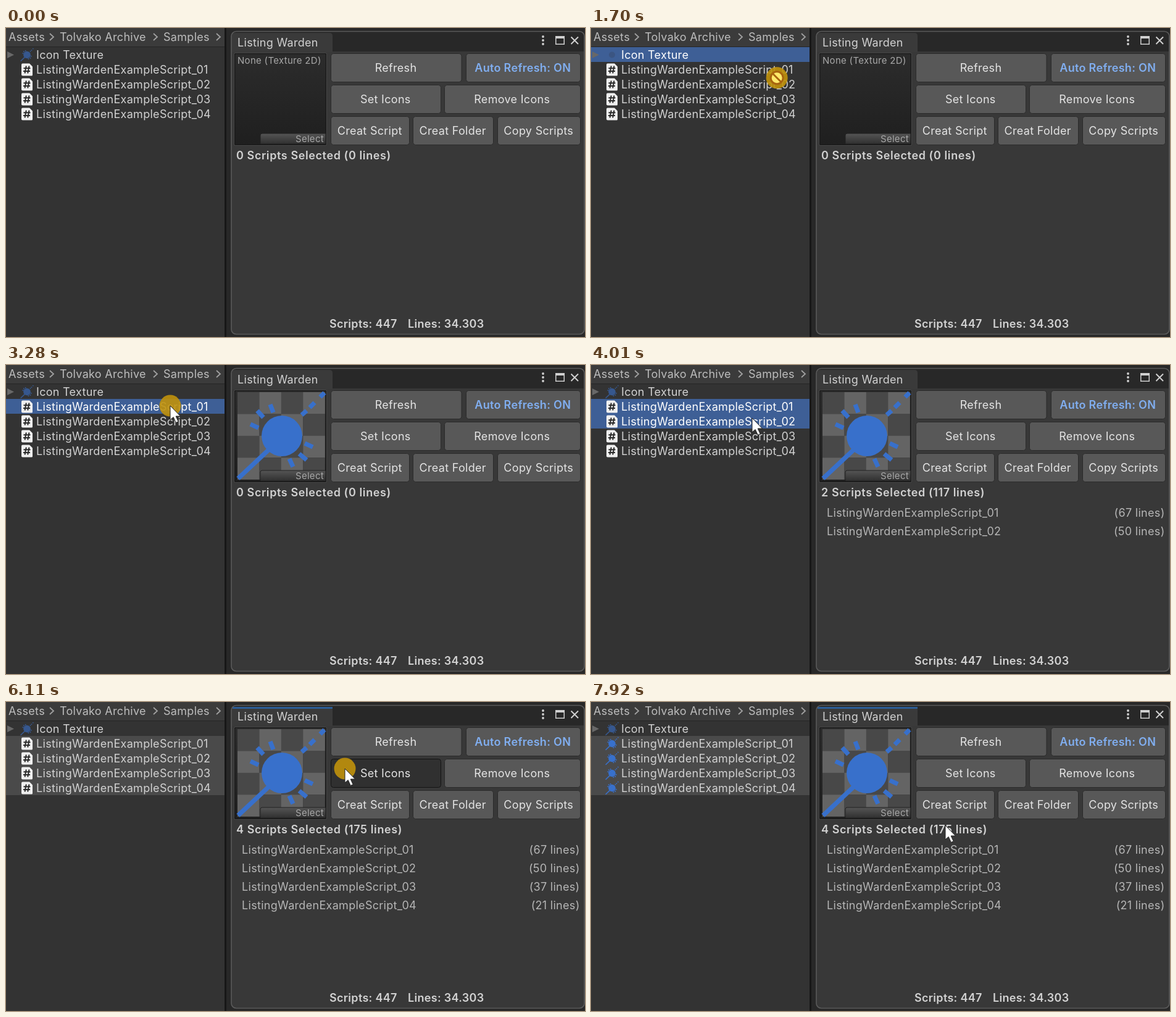
These frames come from a looping animation (938x501 px, 7990 ms). An HTML page:

```html
<!DOCTYPE html>
<html lang="en">
<head>
<meta charset="utf-8">
<title>Listing Warden</title>
<style>
  html, body { margin: 0; width: 100%; height: 100%; overflow: hidden; background: #333; }
  svg { display: block; width: 938px; height: 501px; }
  text { font: 400 18px Inter, "Open Sans", sans-serif; letter-spacing: .3px; fill: #d2d2d2; white-space: pre; }
  .bold { font-weight: 600; }
  .wide { letter-spacing: .6px; }
  .small { font-size: 15px; fill: #a8a8a8; }
</style>
</head>
<body>
<svg id="stage" viewBox="0 0 938 501">
  <defs>
    <linearGradient id="well" x2="0" y2="1">
      <stop stop-color="#2c2c2c"/><stop offset="1" stop-color="#1f1f1f"/>
    </linearGradient>
    <linearGradient id="strip" x2="0" y2="1">
      <stop stop-color="#555"/><stop offset="1" stop-color="#303030"/>
    </linearGradient>
    <g id="wand" stroke="#3870cb" fill="none">
      <circle cx="72" cy="71" r="33" fill="#3870cb" stroke="none"/>
      <path d="M1 140L50 94M104 37l8-7M117 25l8-8M134 8l7-7M53 20l5 13M32 30l10 11M21 52l13 6M109 83l13 6M100 100l12 10M84 108l6 13"/>
    </g>
    <g id="mini">
      <use href="#wand" transform="translate(23.5 -10.5) scale(.148)" stroke-width="11"/>
      <circle cx="34" cy="0" r="5.8" fill="#3870cb"/>
    </g>
    <g id="page">
      <path d="M27 -10H38L43 -5V8.5Q43 10 41.500 10H27Q25 10 25 8V-8Q25 -10 27 -10Z" fill="#f0f0f0"/>
      <path d="M32.800 -6L30.500 6M37.500 -6L35.200 6M28.500 -2.200H39.500M28 2.600H39" stroke="#2b2b2b" stroke-width="2" fill="none"/>
    </g>
  </defs>
</svg>
<script>
const LOOP = 7990, STEP = 70;
const svg = document.getElementById('stage');

function add(tag, attrs, parent = svg, text) {
  const node = document.createElementNS('http://www.w3.org/2000/svg', tag);
  set(node, attrs);
  if (text) node.textContent = text;
  parent.append(node);
  return node;
}
function set(node, attrs) {
  for (const k in attrs) node.setAttribute(k, attrs[k]);
}
const rect = (x, y, width, height, fill, more, parent) =>
  add('rect', { x, y, width, height, fill, ...more }, parent);
const label = (x, y, str, more, parent) => add('text', { x, y, ...more }, parent, str);
const path = (d, more) => add('path', { d, fill: 'none', ...more });
const show = (node, on) => { node.style.display = on ? '' : 'none'; };
const within = (t, a, b) => t >= a && t < b;

// Left pane
rect(0, 0, 354, 501, '#333');
rect(0, 0, 354, 30, '#3b3b3b');
rect(0, 30, 354, 1, '#252525');
[[4, 'Assets'], [87, 'Tolvako Archive'], [255, 'Samples']].forEach(([x, s]) => label(x, 21, s, { style: 'fill:#bdbdbd' }));
[71, 239, 341].forEach(x => path(`M${x} 9l6 5.500-6 5.500`, { stroke: '#a0a0a0', 'stroke-width': 1.8 }));

const textureRow = rect(0, 31, 354, 24, '#3e5f96');
path('M2 38L13 43.500L2 49Z', { style: 'fill:#686868' });
const textureIcon = add('use', { href: '#mini', y: 43.5, opacity: .6 });
const textureDot = add('circle', { cx: 34, cy: 43.5, r: 5, fill: '#3b5582' });
const textureName = label(49, 50, 'Icon Texture');

const fileName = i => `ListingWardenExampleScript_0${i + 1}`;
const rows = [0, 1, 2, 3].map(i => {
  const y = 55 + 24 * i;
  return {
    back: rect(0, y, 354, 24, '#3e5f96'),
    page: add('use', { href: '#page', y: y + 12.5 }),
    mini: add('use', { href: '#mini', y: y + 12.5 }),
    name: label(49, y + 19, fileName(i))
  };
});

// Right window
rect(354, 0, 584, 501, '#282828');
rect(354, 0, 3, 501, '#171717');
rect(365, 5.5, 572, 491, '#383838', { rx: 8 });
path('M366 38V13Q366 6 373 6H929Q936 6 936 13V38Z', { style: 'fill:#282828' });
path('M366 39V13Q366 8 371 8H524Q529 8 529 13V39Z', { style: 'fill:#3a3a3a' });
const stripe = rect(367, 8, 162, 3, '#2c5d96');
rect(365, 5.5, 572, 491, 'none', { rx: 8, stroke: '#5a5a5a', 'stroke-width': 1.6 });
label(375, 30, 'Listing Warden');
[14, 20, 26].forEach(cy => add('circle', { cx: 870, cy, r: 1.9, fill: '#d0d0d0' }));
path('M890.750 13V26.250H904.250V13', { stroke: '#d0d0d0', 'stroke-width': 1.5 });
rect(890, 13, 15, 4, '#d0d0d0');
path('M915.500 14.500l11.500 11.500M927 14.500l-11.500 11.500', { stroke: '#d0d0d0', 'stroke-width': 2 });

// Texture slot
rect(370.5, 41.5, 148, 148, 'url(#well)', { rx: 2, stroke: '#191919', 'stroke-width': 1.5 });
rect(369.5, 40.5, 150, 150, 'none', { rx: 2, stroke: '#484848' });
const noTexture = label(375, 58, 'None (Texture 2D)', { class: 'small' });
const texture = add('g', { transform: 'translate(375 44)' });
for (let i = 0; i < 16; i++) {
  const c = i % 4, r = i >> 2;
  rect(c * 35.4, r * 35.4, 35.6, 35.6, (c + r) % 2 ? '#646464' : '#484848', {}, texture);
}
add('use', { href: '#wand', 'stroke-width': 7.3 }, texture);
path('M412 188V174Q412 171 415 171H518V188Z', { style: 'fill:url(#strip)', stroke: '#202020' });
label(515, 185, 'Select', { class: 'small', 'text-anchor': 'end' });

// Buttons
function button(x, y, w, str, cls = '', fill = '#e4e4e4') {
  const box = rect(x, y - .5, w + .5, 46, '#585858', { rx: 4, stroke: '#2b2b2b', 'stroke-width': 1 });
  label(x + w / 2 - .5, y + 29, str, { class: cls, style: `fill:${fill}`, 'text-anchor': 'middle' });
  return box;
}
button(526.5, 42, 211, 'Refresh');
button(745.5, 42, 184.5, 'Auto Refresh: ON', 'bold', '#80aef0');
const setIcons = button(526.5, 93, 177.5, 'Set Icons');
button(710.5, 93, 219.5, 'Remove Icons');
const creat = button(526.5, 144, 126.5, 'Creat Script');
button(659.5, 144, 129.5, 'Creat Folder');
button(796.5, 144, 133.5, 'Copy Scripts');

const total = label(373, 213, '', { class: 'bold wide' });
const lines = [67, 50, 37, 21];
const list = lines.map((n, i) => {
  const g = add('g', {}), y = 246 + 30 * i;
  label(382, y, fileName(i), { style: 'fill:#b6b6b6' }, g);
  label(929.5, y, `(${n} lines)`, { style: 'fill:#b6b6b6', 'text-anchor': 'end' }, g);
  return g;
});
label(524, 486, 'Scripts: 447', { class: 'bold' });
label(651, 486, 'Lines: 34.303', { class: 'bold' });

// Pointer
const pointer = add('g', {});
const halo = add('circle', { r: 17.5, fill: '#c0920c', opacity: .9 }, pointer);
const arrow = add('path', {
  d: 'M0 0V23L5.200 18.500L9.300 27.500L13.200 25.800L9.200 17H16.500Z',
  fill: '#fff', stroke: '#222', 'stroke-width': 1
}, pointer);
const denied = add('g', { stroke: '#a8640f', 'stroke-width': 3 }, pointer);
add('circle', { r: 10, fill: '#ffe96a' }, denied);
add('path', { d: 'M-7 -7L7 7' }, denied);
const ring = add('g', { fill: 'none', 'stroke-width': 5 }, pointer);
add('circle', { r: 11.5, stroke: '#2793e2' }, ring);
add('path', { d: 'M0 -11.500A11.500 11.500 0 0 1 11.500 0', stroke: '#6cc6f2' }, ring);

// start, steps, end x, end y
const moves = [
  [530, 8, 146, 45], [1560, 8, 428, 110], [2520, 8, 266, 66], [3480, 5, 261, 86],
  [4140, 4, 262, 110], [4620, 3, 266, 134], [5220, 3, 420, 154], [5430, 4, 549, 108],
  [7780, 3, 574, 200]
];
const presses = [[1290, 2310], [3280, 3420], [3880, 4010], [4420, 4550], [4890, 5020], [6110, 6250]];
const selectAt = [3280, 3880, 4420, 4890];
const listAt = [3420, 4010, 4550, 5020];

function position(t) {
  let x = 253, y = 503;
  for (const [start, n, ex, ey] of moves) {
    if (t < start) break;
    const p = Math.min(1, (Math.floor((t - start) / STEP) + 1) / n);
    const e = 1 - (1 - p) ** 1.7;
    x += (ex - x) * e;
    y += (ey - y) * e;
  }
  return [x, y];
}

function draw(t) {
  const picked = within(t, 1290, 1980);
  show(textureRow, picked);
  show(textureDot, picked);
  show(textureIcon, !picked);
  textureName.style.fill = picked ? '#fff' : '';

  const rightFocus = within(t, 1980, 3280) || t >= 6110;
  show(stripe, rightFocus);
  rows.forEach((row, i) => {
    const on = t >= selectAt[i], done = t >= 7640;
    show(row.back, on);
    set(row.back, { fill: rightFocus ? '#4a4a4a' : '#3e5f96' });
    row.name.style.fill = on && !rightFocus ? '#fff' : '';
    show(row.page, !done);
    show(row.mini, done);
  });

  show(texture, t >= 2310);
  show(noTexture, t < 2310);

  const count = listAt.filter(a => t >= a).length;
  const sum = lines.slice(0, count).reduce((a, b) => a + b, 0);
  total.textContent = `${count} Scripts Selected (${sum} lines)`;
  list.forEach((g, i) => show(g, i < count));

  const busy = within(t, 6250, 7710);
  const pressed = within(t, 6110, 7640);
  set(setIcons, {
    fill: pressed ? '#303030' : within(t, 5500, 6110) ? '#676767' : '#585858',
    stroke: pressed ? '#141414' : '#2b2b2b'
  });
  set(creat, { fill: within(t, 7780, 7920) ? '#676767' : '#585858' });

  const [x, y] = position(t);
  const blocked = within(t, 1560, 2050) && x < 357;
  set(pointer, { transform: `translate(${x} ${y})` });
  show(pointer, t >= 530);
  show(halo, presses.some(([a, b]) => within(t, a, b)));
  show(denied, blocked);
  show(ring, busy);
  show(arrow, !blocked && !busy);
  set(ring, { transform: `translate(-1 12.500) rotate(${Math.floor(t / STEP) * 32 % 360})` });
}

const began = performance.now();
function tick() {
  draw((performance.now() - began) % LOOP);
  requestAnimationFrame(tick);
}
tick();
</script>
</body>
</html>
```
